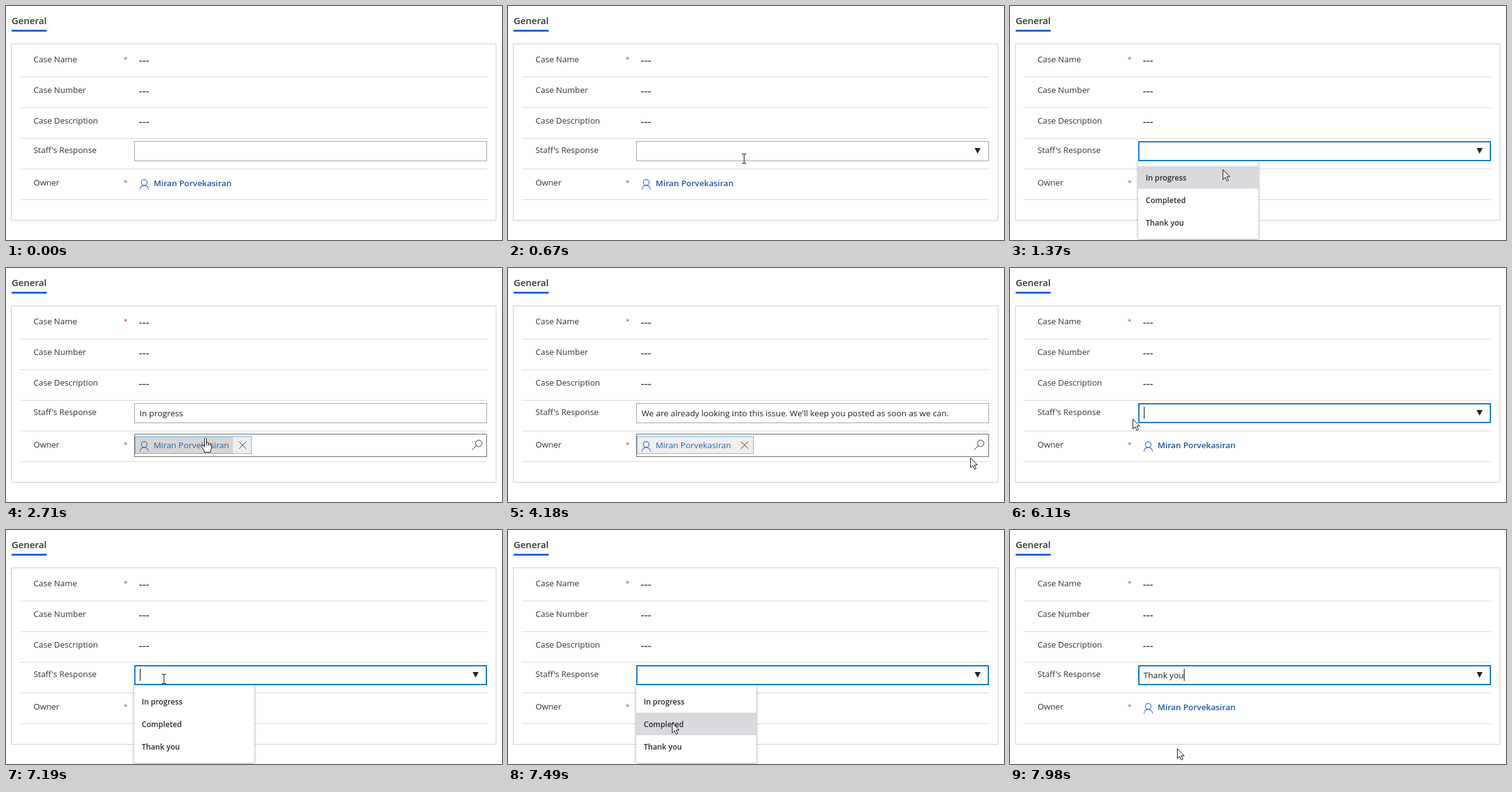
These frames come from a looping animation (793x374 px, 8000 ms). An HTML page:

```html
<!DOCTYPE html>
<html lang="en">
<head>
<meta charset="utf-8">
<title>Case form</title>
<style>
  html, body { margin: 0; width: 100%; height: 100%; overflow: hidden; background: #fff; }
  svg { display: block; width: 793px; height: 374px; font: 13.2px "Open Sans", "Noto Sans", sans-serif; }
  .heading { font-size: 14.8px; font-weight: 600; fill: #333; }
  .label { fill: #333; }
  .empty { font-size: 17px; font-weight: 600; fill: #444; }
  .required { font-size: 11.5px; fill: #c0501f; }
  .value { font-size: 13.33px; fill: #222; }
  .selected { font-size: 13.33px; fill: #fff; }
  .option { font-size: 12.15px; font-weight: 600; fill: #2a2a2e; }
  .owner-link { font-size: 13.25px; font-weight: 600; fill: #1d56a8; }
  .owner-chip { font-size: 13.4px; fill: #1f62b0; }
  .menu-box { filter: drop-shadow(0 1px 2px rgba(0, 0, 0, .42)); }
  .line { fill: none; stroke: #333; }
</style>
</head>
<body>
<svg viewBox="0 0 793 374">
  <defs>
    <clipPath id="selectionClip"><rect id="clipBox" y="222" height="19"/></clipPath>
  </defs>
  <text class="heading" x="9" y="28.5">General</text>
  <rect x="9" y="38" width="56" height="3" fill="#1160e0"/>
  <rect x="8.5" y="60.5" width="775" height="282" fill="none" stroke="#ccc"/>
  <g id="form"></g>

  <g id="person" fill="none" stroke="#2b5ec4" stroke-width="1.1">
    <circle cx="221" cy="282" r="4.6"/>
    <path d="M214.200 293.500C214.200 284.300 227.800 284.300 227.800 293.500"/>
  </g>
  <text id="ownerLink" class="owner-link" x="236" y="288">Miran Porvekasiran</text>
  <g id="ownerEdit">
    <rect x="205.500" y="265.500" width="563" height="36" fill="#fff" stroke="#666"/>
    <rect x="206" y="269" width="187" height="28" fill="#efefef"/>
    <rect id="chipHover" x="206" y="269" width="157" height="28" fill="#d6d6d6"/>
    <rect id="chipFocus" x="206.500" y="269.500" width="186" height="27" fill="none" stroke="#0b78d0" stroke-dasharray="1 1"/>
    <use href="#person"/>
    <text class="owner-chip" x="236" y="288">Miran Porvekasiran</text>
    <path class="line" d="M372.500 277.500l11.500 11.500m0-11.500l-11.500 11.500M752 284l-7 7"/>
    <circle class="line" cx="755.800" cy="280.300" r="5.200"/>
  </g>

  <g id="menu">
    <rect class="menu-box" x="205" y="246" width="192" height="126.500" rx="2" fill="#fff"/>
    <rect id="optionHover" x="205" width="192" height="36" fill="#d9dade"/>
    <g id="options"></g>
  </g>

  <rect id="fieldBox" fill="#fff"/>
  <path id="fieldArrow" d="M746 227h9.600l-4.800 9z" fill="#222"/>
  <text id="value" class="value" x="213.500" y="237"></text>
  <rect id="selection" y="222" height="19" fill="#3390ff"/>
  <text id="selectedText" class="selected" x="213.500" y="237" clip-path="url(#selectionClip)"></text>
  <rect id="caret" y="222" width="1" height="19" fill="#000"/>

  <circle id="press" r="11" fill="#ffe03c" opacity=".8"/>
  <g id="pointer" stroke="#111">
    <path id="arrow" d="M.5.5V16.300L4.200 12.800 6.800 18.600 9.300 17.500 6.700 11.800H11.600Z" fill="#fff"/>
    <path id="beam" d="M-3-7.500H-1Q.5-7.500.5-6V6Q.5 7.500-1 7.500H-3M4-7.500H2Q.5-7.500.5-6V6Q.5 7.500 2 7.500H4" fill="none"/>
    <path id="hand" d="M-1.500 15V2Q0-1 1.500 2V8Q3.500 7 4.500 9 6.500 8 7.300 10 9.500 9.300 9.700 12V16Q9 19 8 21V23.500H-2V21.500Q-4 18-6.500 14.500-7.500 11.500-4.500 12.200L-1.500 15ZM1.500 8V13M4.500 9V13M7.300 10V13.500" fill="#fff"/>
  </g>
</svg>
<script>
const LOOP = 8000, POINTER_STEP = 77, BLINK = 540;
const TEXT_LEFT = 213.5, TEXT_RIGHT = 705;
const REPLY = "We are already looking into this issue. We'll keep you posted as soon as we can.";
const el = Object.fromEntries([...document.querySelectorAll("[id]")].map(n => [n.id, n]));

function set(node, attrs) {
  for (const key in attrs) node.setAttribute(key, attrs[key]);
}
function add(parent, name, attrs, text = "") {
  const node = document.createElementNS("http://www.w3.org/2000/svg", name);
  set(node, attrs);
  node.textContent = text;
  parent.append(node);
}
function show(node, on) { node.style.display = on ? "" : "none"; }

// Static form rows
["Case Name", "Case Number", "Case Description", "Staff's Response", "Owner"].forEach((name, i) => {
  const y = 90 + 49 * i;
  const labelY = i === 3 ? y - 2 : i === 4 ? y + 1 : y;
  add(el.form, "text", { class: "label", x: 44, y: labelY }, name);
  add(el.form, "rect", { x: 23, y: 113 + 49 * i, width: 746, height: 1, fill: "#d6d6d6" });
  if (i < 3) add(el.form, "text", { class: "empty", x: 212.5, y: y + 3 }, "---");
  if (i % 4 === 0) add(el.form, "text", { class: "required", x: 188, y: labelY - 1 }, "*");
});
["In progress", "Completed", "Thank you"].forEach((name, i) =>
  add(el.options, "text", { class: "option", x: 217, y: 279 + 36 * i }, name));

// What the user does, as changes to the form state
const actions = [
  { at: 0, text: "" },
  { at: 680, press: true, focus: "field" },
  { at: 760, press: false, menu: true },
  { at: 2010, press: true },
  { at: 2080, press: false, menu: false, text: "In progress" },
  { at: 2630, press: true, focus: "owner" },
  { at: 2710, press: false },
  { at: 3090, text: REPLY },
  { at: 4490, press: true, focus: "field", selecting: true },
  { at: 5500, press: false },
  { at: 6110, selecting: false, text: "" },
  { at: 6950, press: true },
  { at: 7030, press: false, menu: true },
  { at: 7900, press: true },
  { at: 7980, press: false, menu: false, text: "Thank you" }
];

// Pointer moves; each begins where the one before ended
const moves = [
  { from: 0, to: 0, x: 343, y: 400 },
  { from: 70, to: 530, x: 377, y: 244 },
  { from: 1220, to: 1610, x: 319, y: 271 },
  { from: 2750, to: 2940, x: 350, y: 400 },
  { from: 4180, to: 4180, x: 739, y: 303 },
  { from: 4250, to: 4490, x: 709, y: 237 },
  { from: 4500, to: 4950, x: 268, y: 238 },
  { from: 5060, to: 5420, x: 196, y: 241 },
  { from: 6660, to: 6800, x: 252, y: 238 },
  { from: 7340, to: 7730, x: 267, y: 349 }
];

const easeOut = p => 1 - (1 - p) ** 2;
const mix = (a, b, p) => a + (b - a) * p;

function pointerAt(t) {
  const i = moves.findLastIndex(move => move.from <= t);
  const move = moves[i], last = moves[i - 1] ?? move;
  const elapsed = (Math.floor((t - move.from) / POINTER_STEP) + 1) * POINTER_STEP;
  const p = easeOut(Math.min(1, elapsed / (move.to - move.from)));
  return [mix(last.x, move.x, p), mix(last.y, move.y, p)];
}

function stateAt(t) {
  const past = actions.filter(action => action.at <= t);
  const lastInput = past.findLast(action => action.press || "text" in action);
  return Object.assign({}, ...past, { sinceInput: t - lastInput.at });
}

function render(t) {
  const [x, y] = pointerAt(t);
  const { text, focus, menu, press, selecting, sinceInput } = stateAt(t);
  const over = (left, top, right, bottom) => x >= left && x < right && y >= top && y < bottom;
  const active = focus === "field";
  const dragging = press && selecting;
  const overField = over(205, 216, 769, 248);
  const ownerReachable = !menu && !dragging;

  // Response field
  const inset = active ? 1 : 0.5;
  set(el.fieldBox, {
    x: 205 + inset, y: 216 + inset, width: 564 - 2 * inset, height: 32 - 2 * inset,
    stroke: active ? "#0b76cc" : "#a0a0a0", "stroke-width": 2 * inset
  });
  show(el.fieldArrow, active || overField);
  el.value.textContent = el.selectedText.textContent = text;

  const left = Math.min(TEXT_RIGHT, Math.max(TEXT_LEFT, x - 1));
  const range = { x: left, width: selecting ? TEXT_RIGHT - left : 0 };
  set(el.selection, range);
  set(el.clipBox, range);
  show(el.selectedText, selecting);

  show(el.caret, active && !selecting && sinceInput % (2 * BLINK) < BLINK);
  set(el.caret, { x: Math.round(TEXT_LEFT + (text ? el.value.getComputedTextLength() : 0.5)) });

  // Suggestions
  show(el.menu, menu);
  show(el.optionHover, over(205, 256, 397, 364));
  set(el.optionHover, { y: 256 + 36 * Math.floor((y - 256) / 36) });

  // Owner
  const editing = focus === "owner" || (ownerReachable && over(205, 265, 769, 302));
  const overName = ownerReachable && over(206, 269, 363, 297);
  show(el.ownerEdit, editing);
  show(el.ownerLink, !editing);
  show(el.chipFocus, focus === "owner");
  show(el.chipHover, overName);

  // Pointer
  const kind = overField || dragging ? "beam" : overName ? "hand" : "arrow";
  for (const name of ["arrow", "beam", "hand"]) show(el[name], name === kind);
  set(el.pointer, { transform: `translate(${Math.round(x)} ${Math.round(y)})` });
  set(el.press, { cx: x - 3, cy: y - 2 });
  show(el.press, press);
}

const start = performance.now();
function tick() {
  render((performance.now() - start) % LOOP);
  requestAnimationFrame(tick);
}
tick();
</script>
</body>
</html>
```
